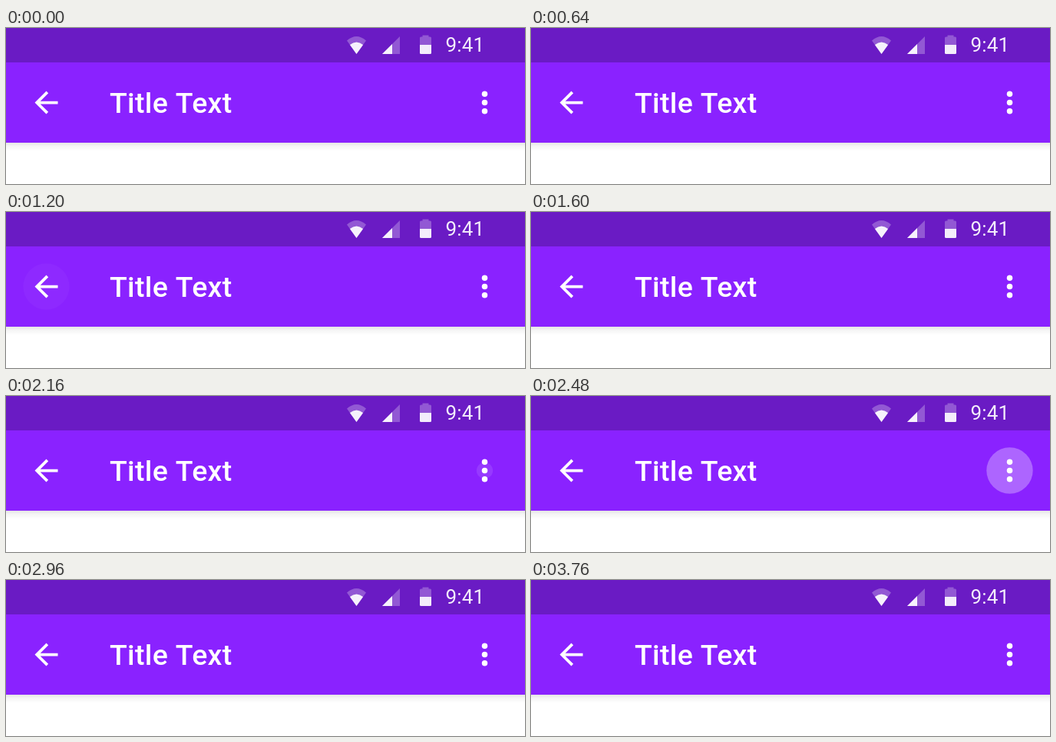
Animation of 676x204 px, one loop 3920 ms. Source, as an HTML page with a canvas:

```html
<!DOCTYPE html>
<html lang="en">
<head>
<meta charset="utf-8">
<title>App bar</title>
<style>
  html, body { margin: 0; width: 100%; height: 100%; overflow: hidden; background: #fff; }
  canvas { display: block; width: 676px; height: 204px; }
</style>
</head>
<body>
<canvas id="stage" width="676" height="204"></canvas>
<script>
const W = 676, H = 204, LOOP = 3920, STEP = 80;
const DP = 1.875;
const BAR_Y = 45, BAR_BOTTOM = 150, MID = 97.5;
const ctx = document.getElementById('stage').getContext('2d');

const ripples = [
  { x: 52.5, grow: 600, fade: 1040 },
  { x: 623.5, grow: 2000, fade: 2640 }
];
const GROW_MS = 400, FADE_MS = 240, RADIUS = 30.2, PEAK = 0.3;

const DIM = 'rgba(255,255,255,0.27)';
const LIT = 'rgba(255,255,255,0.92)';
const arrow = new Path2D('M20 11H7.83l5.59-5.59L12 4l-8 8 8 8 1.41-1.41L7.83 13H20z');
const wifi = new Path2D('M456.5 34L444 16.5Q456.5 5.5 469 16.5Z');
const wifiLevel = new Path2D('M456.5 34L447.9 22Q456.5 15 465.1 22Z');
const signal = new Path2D('M490 34H513V11Z');
const signalLevel = new Path2D('M490 34H503V21Z');
const battery = new Path2D('M542.5 9.5h8v2h2q1.5 0 1.5 1.5v9h-15v-9q0-1.5 1.5-1.5h2Z');
const batteryLevel = new Path2D('M539 22h15v10.5q0 1.5-1.5 1.5h-12q-1.5 0-1.5-1.5Z');

const clamp = v => Math.min(1, Math.max(0, v));
const smooth = v => v * v * (3 - 2 * v);

function fill(path, color) {
  ctx.fillStyle = color;
  ctx.fill(path);
}

function disc(x, y, r, color) {
  ctx.fillStyle = color;
  ctx.beginPath();
  ctx.arc(x, y, r, 0, Math.PI * 2);
  ctx.fill();
}

function text(str, x, y, font, spacing, color) {
  ctx.font = font + ' Roboto, sans-serif';
  ctx.letterSpacing = spacing;
  ctx.fillStyle = color;
  ctx.fillText(str, x, y);
}

function drawBars() {
  ctx.fillStyle = '#fff';
  ctx.fillRect(0, 0, W, H);
  const shade = ctx.createLinearGradient(0, BAR_BOTTOM, 0, BAR_BOTTOM + 11);
  shade.addColorStop(0, 'rgba(0,0,0,0.1)');
  shade.addColorStop(0.4, 'rgba(0,0,0,0.045)');
  shade.addColorStop(1, 'rgba(0,0,0,0)');
  ctx.fillStyle = shade;
  ctx.fillRect(0, BAR_BOTTOM, W, 11);
  ctx.fillStyle = '#8a22ff';
  ctx.fillRect(0, BAR_Y, W, BAR_BOTTOM - BAR_Y);
  ctx.fillStyle = '#6a1bc4';
  ctx.fillRect(0, 0, W, BAR_Y);
}

function drawStatus() {
  fill(wifi, DIM);
  fill(wifiLevel, LIT);
  fill(signal, DIM);
  fill(signalLevel, LIT);
  fill(battery, DIM);
  fill(batteryLevel, LIT);
  text('9:41', 572.5, 31, '400 26px', '0.2px', LIT);
}

function drawRipple({ x, grow, fade }, t) {
  const size = smooth(clamp((t - grow) / GROW_MS));
  const left = 1 - clamp((t - fade) / FADE_MS);
  const alpha = PEAK * size * left * left;
  if (alpha > 0) disc(x, MID, RADIUS * size, `rgba(255,255,255,${alpha})`);
}

function drawToolbar() {
  ctx.save();
  ctx.translate(30, 75);
  ctx.scale(DP, DP);
  fill(arrow, '#fff');
  ctx.restore();
  text('Title Text', 135, 111, '500 37.5px', '0.3px', '#fff');
  for (const row of [-1, 0, 1]) disc(623.5, MID + row * 6 * DP, 2 * DP, '#fff');
}

function render(now) {
  const t = Math.floor((now % LOOP) / STEP) * STEP;
  drawBars();
  drawStatus();
  ripples.forEach(r => drawRipple(r, t));
  drawToolbar();
}

const start = performance.now();
function tick() {
  render(performance.now() - start);
  requestAnimationFrame(tick);
}
tick();
</script>
</body>
</html>
```
